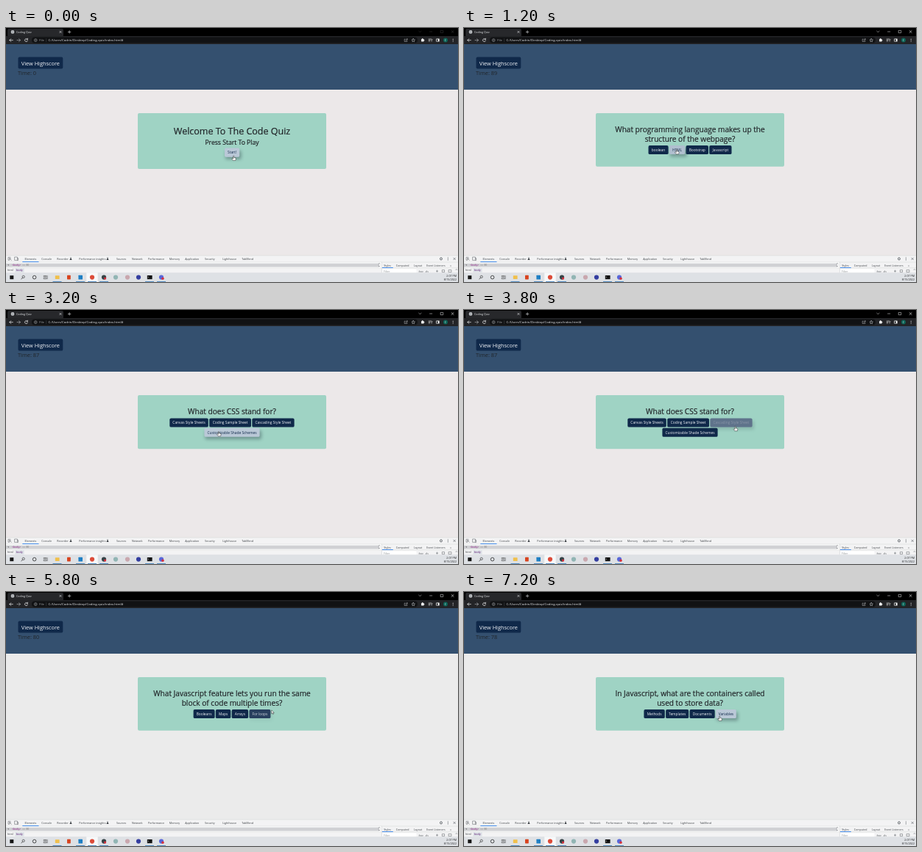
Write an HTML page that moves like this. It is 614 by 346 pixels and loops after 8000 ms.

```html
<!DOCTYPE html>
<html lang="en">
<head>
<meta charset="utf-8">
<title>Coding Quiz</title>
<style>
  html, body { margin: 0; width: 100%; height: 100%; overflow: hidden; background: #ece8e9; }
  svg { display: block; width: 100vw; height: 100vh; }
  text { font-family: "Open Sans", "Noto Sans", sans-serif; white-space: pre; }
  .shade { filter: blur(2.2px); }
</style>
</head>
<body>
<svg id="stage" viewBox="0 0 614 346"></svg>
<script>
const LOOP = 8000;
const NAVY = [16, 41, 74], LIGHT = [186, 200, 215], WHITE = [240, 243, 247];
const stage = document.getElementById('stage');

function add(parent, tag, attrs, content) {
  const el = document.createElementNS('http://www.w3.org/2000/svg', tag);
  for (const key in attrs) el.setAttribute(key, attrs[key]);
  if (content !== undefined) el.textContent = content;
  return parent.appendChild(el);
}
const group = (parent = stage) => add(parent, 'g', {});
const box = (p, x, y, w, h, fill, rx = 0) => add(p, 'rect', { x, y, width: w, height: h, fill, rx });
const dot = (p, cx, cy, r, fill) => add(p, 'circle', { cx, cy, r, fill });
const label = (p, x, y, size, fill, text, anchor = 'start') =>
  add(p, 'text', { x, y, 'font-size': size, fill, 'text-anchor': anchor }, text);
const line = (p, d, stroke, width = 0.6) =>
  add(p, 'path', { d, stroke, 'stroke-width': width, fill: 'none', 'stroke-linecap': 'round', 'stroke-linejoin': 'round' });
const ring = (p, cx, cy, r, stroke, width = 0.6) =>
  add(p, 'circle', { cx, cy, r, stroke, 'stroke-width': width, fill: 'none' });
const cross = (p, x, y, r, color) =>
  line(p, `M${x - r} ${y - r}l${2 * r} ${2 * r}m0 ${-2 * r}l${-2 * r} ${2 * r}`, color);
const dots = (p, x, y, color) => [-1.7, 0, 1.7].forEach(d => dot(p, x, y + d, 0.5, color));

// Browser window
const page = box(stage, 0, 0, 614, 346, '#ece8e9');
const chrome = group();
box(chrome, 0, 0, 614, 22, '#000');
box(chrome, 2, 1, 76, 11, '#27282b', 2);
box(chrome, 0, 11, 614, 11, '#232427');
box(chrome, 35, 12.6, 524, 8, '#111214', 4);
dot(chrome, 9, 5.4, 2.3, '#d5d8dc');
line(chrome, 'M7 5.4h4M9 3.2v4.4', '#55585c', 0.4);
label(chrome, 14, 6.8, 3.7, '#e8eaed', 'Coding Quiz');
cross(chrome, 74, 5.4, 1.2, '#e8eaed');
line(chrome, 'M84.3 5.4h3.6M86.1 3.6v3.6', '#e8eaed');
line(chrome, 'M9.3 16.6h-4.4m1.8-1.9l-1.9 1.9l1.9 1.9', '#f1f3f4', 0.7);
line(chrome, 'M15 16.6h4.4m-1.8-1.9l1.9 1.9l-1.9 1.9', '#a9acb0', 0.7);
line(chrome, 'M29.2 15.5a2 2 0 1 0 .2 1.8M29.4 14.2v1.5h-1.5', '#f1f3f4', 0.7);
ring(chrome, 40.2, 16.6, 1.9, '#b5b8bc', 0.5);
line(chrome, 'M40.2 16.4v1.2M40.2 15.4v.1', '#b5b8bc', 0.5);
label(chrome, 45.3, 18.1, 4.2, '#a4a7ab', 'File');
line(chrome, 'M54.6 14.6v4', '#55585c', 0.4);
label(chrome, 57.5, 18.1, 4.35, '#e8eaed', 'C:/Users/Cadrin/Desktop/Coding-quiz/index.html#');
line(chrome, 'M542.6 15.2h-1.4v3.2h3.8v-1.2M543 17.2q.3-2 2.3-2m-.9-.9l1 .9l-1 .9', '#c4c7ca', 0.5);
line(chrome, 'M553.3 14.4l.7 1.5l1.6.2l-1.2 1.1l.3 1.6l-1.4-.8l-1.4.8l.3-1.6l-1.2-1.1l1.6-.2z', '#d5d8dc', 0.5);
box(chrome, 564.1, 15.1, 3.5, 3.5, '#f1f3f4', 0.5);
dot(chrome, 565.8, 14.9, 0.8, '#f1f3f4');
dot(chrome, 567.7, 16.8, 0.8, '#f1f3f4');
line(chrome, 'M574.2 15h3.5M574.2 16.5h2M574.2 18h1.6M578.2 18.1v-2.4h.9', '#f1f3f4');
box(chrome, 584.3, 14.6, 4.4, 4, '#f1f3f4', 0.5);
box(chrome, 585, 15.3, 1.7, 2.6, '#232427');
dot(chrome, 597, 16.6, 3, '#0c6357');
label(chrome, 597, 18, 3.8, '#e4f3ef', 'C', 'middle');
dots(chrome, 607.2, 16.6, '#f1f3f4');
const controls = group(chrome);
line(controls, 'M560.8 4.2l1.6 1.5l1.6-1.5M575.6 5h3.2M590.6 3.4h3.2v3.2h-3.2z', '#f1f3f4', 0.5);
cross(controls, 606.6, 5, 1.5, '#f1f3f4');

// Page header
box(stage, 0, 22, 614, 62, '#34506f');
box(stage, 16.5, 39.6, 60.8, 16, '#10294a', 2);
label(stage, 46.9, 50.6, 7.36, '#f0f3f7', 'View Highscore', 'middle');
const timer = label(stage, 16, 64, 7.4, '#212529', '');

// Quiz cards; each button is [text, left, right, top, hover start, hover end]
const card = box(stage, 179, 116, 256, 76, '#9fd3c4', 2);
const screens = [
  { at: 0, bottom: 192, lines: [['Welcome To The Code Quiz', 145, 12.5], ['Press Start To Play', 158.9, 8.6]],
    buttons: [['Start!', 297, 317.2, 163.6, -400, -1]] },
  { at: 200, bottom: 188.8, lines: [['What programming language makes up the', 142.2], ['structure of the webpage?', 154.5]],
    buttons: [['boolean', 250.5, 277.6, 160], ['HTML', 278.9, 300.2, 160, 860, 1260],
      ['Bootstrap', 301.5, 332, 160], ['Javascript', 333.2, 363.5, 160]] },
  { at: 1930, bottom: 189.3, lines: [['What does CSS stand for?', 142.2]],
    buttons: [['Canvas Style Sheets', 222.3, 274.8, 147.5], ['Coding Sample Sheet', 276.2, 333, 147.5],
      ['Cascading Style Sheet', 334.3, 391.6, 147.5, 3620, 4000],
      ['Customizable Shade Schemes', 269.4, 344.6, 160.7, 1960, 2260, 3350, 3740]] },
  { at: 4440, bottom: 188.8, lines: [['What Javascript feature lets you run the same', 142.2], ['block of code multiple times?', 154.5]],
    buttons: [['Booleans', 254.6, 283.6, 160], ['Maps', 284.8, 305.3, 160],
      ['Arrays', 306.6, 329.1, 160], ['For loops', 330.4, 359.4, 160, 5720, 6060]] },
  { at: 6730, bottom: 188.8, lines: [['In Javascript, what are the containers called', 142.2], ['used to store data?', 154.5]],
    buttons: [['Methods', 244.4, 272.8, 160], ['Templates', 274.1, 305.2, 160],
      ['Documents', 306.5, 340.7, 160], ['Variables', 342, 369.8, 160, 6740, 7060]] }
];
for (const screen of screens) {
  screen.group = group();
  for (const [text, y, size = 10.1] of screen.lines) {
    const heading = label(screen.group, 307, y, size, '#212529', text, 'middle');
    heading.setAttribute('stroke', '#212529');
    heading.setAttribute('stroke-width', 0.2);
  }
  screen.buttons = screen.buttons.map(([text, left, right, top, ...hover]) => {
    const g = group(screen.group), width = right - left;
    const shade = box(g, left + 1, top + 3.5, width + 1.5, 12, '#30454c', 2);
    shade.setAttribute('class', 'shade');
    return { hover, shade, face: box(g, left, top, width, 12.1, '', 1.9),
      text: label(g, left + width / 2, top + 7.8, 4.83, '', text, 'middle') };
  });
}

// Developer tools
const tools = group();
box(tools, 0, 310, 614, 23.5, '#f3f3f4');
box(tools, 0, 319, 510, 8, '#fff');
box(tools, 0, 320.6, 507, 5, '#d0d1d4');
line(tools, 'M0 310h614M0 319h614M0 326.8h614M510.4 319v14', '#c8cacd', 0.4);
line(tools, 'M6 312.3h-3v4h1.4M4.8 314l2.6 2.5M4.8 314v1.8M4.8 314h1.8', '#50555b', 0.5);
line(tools, 'M12 312h3.4v4.4h-3.4zM15.4 313.5h1.2v2.9h-1.2', '#50555b', 0.5);
const tabs = [['Elements', 25.5], ['Console', 48.3], ['Recorder', 69.3], ['Performance insights', 99.3], ['Sources', 150],
  ['Network', 171], ['Performance', 193], ['Memory', 221.8], ['Application', 243.3], ['Security', 270],
  ['Lighthouse', 294.3], ['TabMend', 320.3]];
tabs.forEach(([text, x]) => label(tools, x, 315.9, 3.65, '#3c4045', text));
box(tools, 22.3, 318.2, 22.2, 0.8, '#1a73e8');
[88, 138].forEach(x => add(tools, 'path', { d: `M${x - 0.5} 312.6h1v1.2l1.1 2.3h-3.2l1.1-2.3z`, fill: '#3c4045' }));
ring(tools, 591, 314.4, 1.5, '#50555b', 0.9);
dots(tools, 600.3, 314.4, '#50555b');
cross(tools, 609.2, 314.4, 1.3, '#50555b');
label(tools, 0.8, 324.2, 3.4, '#666', '··▾');
label(tools, 8, 324.3, 3.5, '#881280', '<body>');
label(tools, 22.3, 324.3, 3.5, '#777', '== $0');
line(tools, 'M506.2 321.5l1-1.1l1 1.1M506.2 324l1 1.1l1-1.1', '#50555b', 0.5);
box(tools, 12.3, 327.2, 12.2, 5.6, '#dde1e7');
label(tools, 2, 330.9, 3.65, '#3c4045', 'html');
label(tools, 14, 330.9, 3.65, '#5a1670', 'body');
[['Styles', 513.3], ['Computed', 529.8], ['Layout', 554], ['Event Listeners', 571.3], ['»', 603.2]]
  .forEach(([text, x]) => label(tools, x, 324.6, 3.6, '#3c4045', text));
box(tools, 511, 326.1, 14.8, 0.8, '#1a73e8');
box(tools, 511.5, 328.3, 46, 5, '#fff');
label(tools, 513, 332.8, 3.5, '#85898e', 'Filter');
label(tools, 560, 332.6, 3.5, '#50555b', ':hov  .cls');
line(tools, 'M584.4 331.2h2.4M585.6 330v2.4M592.8 329.6h2.8v3h-2.8zM601.5 329.6h3.5v3h-3.5z', '#50555b', 0.5);
line(tools, 'M611 329.5l.9-1l.9 1', '#50555b', 0.5);

// Taskbar
const bar = group();
box(bar, 0, 333.3, 614, 12.7, '#dee1e5');
box(bar, 109.3, 333.3, 15.4, 12.7, '#f7f8f9');
box(bar, 5.3, 337.2, 5, 5, '#151515');
ring(bar, 23.7, 338.9, 1.6, '#222');
line(bar, 'M22.5 340.2l-1.7 1.8', '#222', 0.7);
ring(bar, 38.6, 339.6, 2.3, '#222', 0.8);
line(bar, 'M51.6 337.5h3.4v1.3h-3.4zM51.6 340.1h3.4v1.7h-3.4zM56.2 337.5v4.3', '#333', 0.5);
box(bar, 66.8, 337.2, 5.8, 4.8, '#f0c04c', 0.5);
box(bar, 83, 336.8, 4.8, 5.6, '#d8431f', 0.6);
box(bar, 98.4, 336.7, 5.6, 5.8, '#1f7fc4', 0.6);
[[117, '#dc4b39'], [133, '#364347'], [149, '#91b5b4'], [165, '#c9a7ae'], [180, '#343ea0'], [211, '#5867d9']]
  .forEach(([x, color]) => dot(bar, x, 339.6, 3.1, color));
dot(bar, 134.6, 341.1, 1.6, '#d62f3d');
dot(bar, 213, 341.2, 1.7, '#d62f3d');
box(bar, 191.8, 337, 6.8, 5.2, '#111');
line(bar, 'M193 338.6l1 .8l-1 .8', '#fff', 0.4);
[69.5, 101, 117, 133, 195, 211].forEach(x => box(bar, x - 6, 345.2, 12, 0.8, '#3478b8'));
label(bar, 612, 338.5, 3.65, '#202225', '2:07 PM', 'end');
label(bar, 612, 343.9, 3.65, '#202225', '8/15/2022', 'end');

// Pointer shapes, each with its hot spot at 0,0
const pointer = group();
const shape = d => add(pointer, 'path', { d, fill: '#fff', stroke: '#111', 'stroke-width': 0.45, 'stroke-linejoin': 'round' });
const shapes = {
  hand: shape('M-.6 .4Q0-.4.6.4V2.6L2.4 3Q3.2 3.2 3.1 4.2L2.6 6.4H-.9L-2.5 4.1Q-2.4 3.2-1.5 3.5L-.6 4.2Z'),
  arrow: shape('M0 0V4.9L1.1 3.9L1.9 5.7L2.8 5.3L2 3.6H3.5Z'),
  beam: line(pointer, 'M-.9-2.7Q0-2.7 0-2.2Q0-2.7.9-2.7M0-2.2V2.2M-.9 2.7Q0 2.7 0 2.2Q0 2.7.9 2.7', '#333', 0.45)
};

const shapeSteps = [[0, 'hand'], [200, 'arrow'], [1040, 'hand'], [4500, 'beam'], [5700, 'arrow'], [5860, 'hand']];
const timeSteps = [[0, 0], [200, 90], [1200, 89], [2200, 88], [3200, 87], [4200, 86], [5200, 85], [5660, 80], [6260, 79], [7200, 78]];
const moves = [[0, 309.2, 174], [800, 309.2, 174], [1200, 289, 165.4], [3250, 289, 165.4], [3760, 368.7, 158.4],
  [4460, 368.7, 158.4], [4600, 368.7, 156], [5660, 368.7, 156], [6000, 347.3, 169], [LOOP, 347.3, 169]];

const clamp = v => Math.min(1, Math.max(0, v));
const ease = (t, a, b) => { const p = clamp((t - a) / (b - a)); return p * p * (3 - 2 * p); };
const current = (steps, t) => steps.filter(([at]) => at <= t).pop()[1];
const mix = (a, b, p) => `rgb(${a.map((v, i) => Math.round(v + (b[i] - v) * p))})`;
const show = (el, on) => el.setAttribute('visibility', on ? 'visible' : 'hidden');

function paintButton({ hover, shade, face, text }, t) {
  const [from, to, out, gone] = hover;
  let p = hover.length ? ease(t, from, to) : 0;
  if (out) p *= 1 - ease(t, out, gone);
  face.setAttribute('fill', mix(NAVY, LIGHT, p));
  text.setAttribute('fill', mix(WHITE, NAVY, p));
  shade.setAttribute('opacity', 0.4 * p);
}

function render(t) {
  const active = screens.filter(s => s.at <= t).pop();
  for (const screen of screens) screen.group.style.display = screen === active ? '' : 'none';
  active.buttons.forEach(button => paintButton(button, t));
  card.setAttribute('height', active.bottom - 116);
  page.setAttribute('fill', t < 4440 ? '#ece8e9' : '#ebebeb');
  controls.setAttribute('opacity', t < 60 ? 0.25 : 1);
  timer.textContent = 'Time: ' + current(timeSteps, t);

  const next = moves.findIndex(([at]) => at > t);
  const [a, x0, y0] = moves[next - 1], [b, x1, y1] = moves[next];
  const p = ease(t, a, b);
  pointer.setAttribute('transform', `translate(${x0 + (x1 - x0) * p} ${y0 + (y1 - y0) * p})`);
  const name = current(shapeSteps, t);
  for (const key in shapes) show(shapes[key], key === name);
}

const start = performance.now();
function tick() {
  render((performance.now() - start) % LOOP);
  requestAnimationFrame(tick);
}
tick();
</script>
</body>
</html>
```
